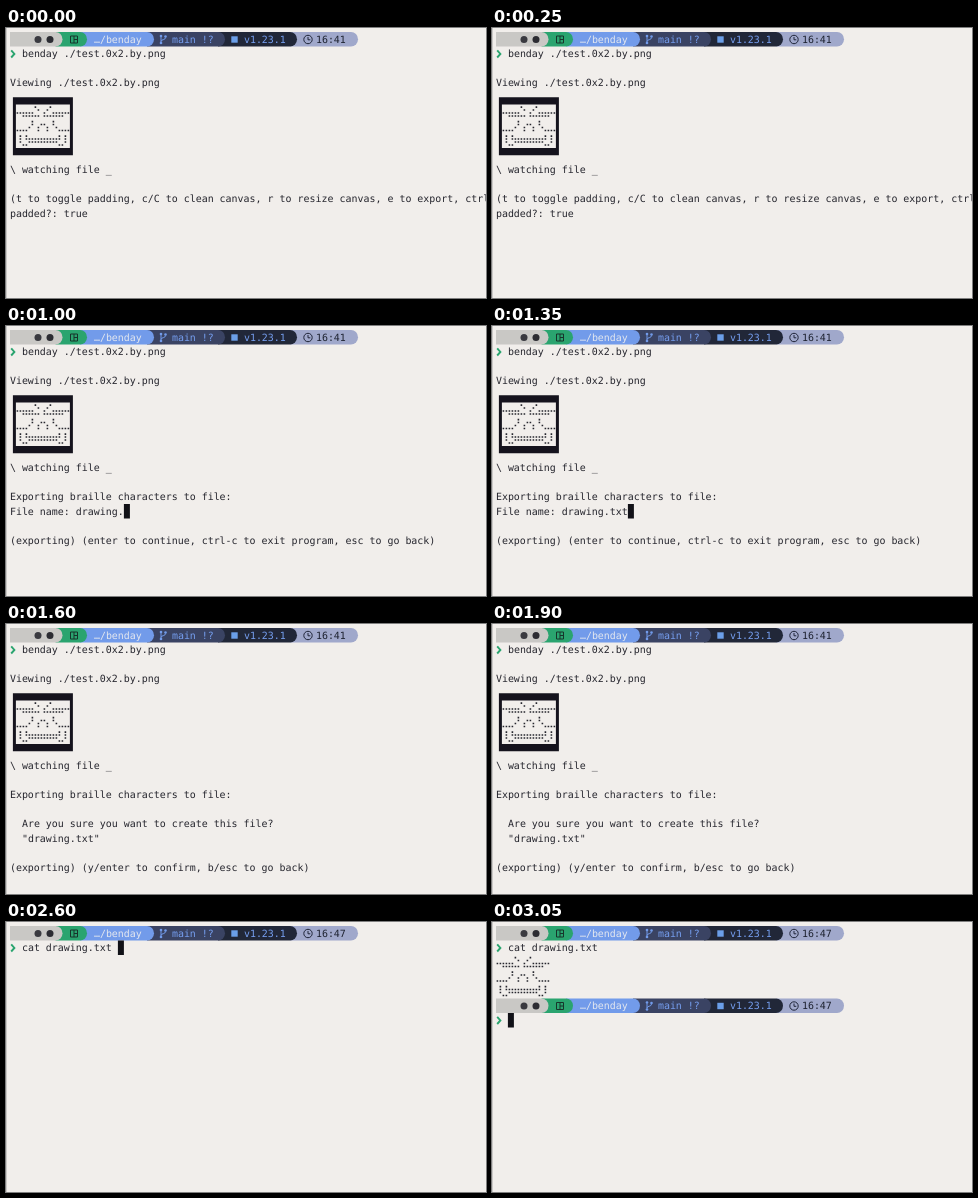
These frames come from a looping animation (480x270 px, 3100 ms). An HTML page:

```html
<!DOCTYPE html>
<html lang="en">
<head>
<meta charset="utf-8">
<title>Terminal session</title>
<style>
  html, body { margin: 0; width: 100%; height: 100%; overflow: hidden; background: #f1eeeb; }
  svg { display: block; width: 480px; height: 270px; }
  text {
    font: 9.96px "DejaVu Sans Mono", "Noto Sans Mono", monospace;
    white-space: pre;
    text-rendering: geometricPrecision;
  }
</style>
</head>
<body>
<svg id="stage" viewBox="0 0 480 270"></svg>
<script>
const LOOP = 3100, STEP = 50;
const CELL = 6, ROW = 14.5, LEFT = 3.9, TOP = 4;
const PAPER = '#f1eeeb', INK = '#26262e', GREEN = '#2aa46f';
const FILE = 'drawing.txt';
const FACE = ['⠤⣤⣤⣑⢠⣊⣤⣤⠤', '⣀⣀⠜⢠⠒⡄⠣⣀⣀', '⠸⣘⠶⠶⠶⠶⠶⣃⠇'];
const stage = document.getElementById('stage');

const colX = col => LEFT + col * CELL;
const rowY = row => TOP + row * ROW;
const rect = (x, y, w, h, fill) =>
  `<rect x="${x}" y="${y}" width="${w}" height="${h}" fill="${fill}"/>`;
const stroke = (d, color, width) =>
  `<path d="${d}" fill="none" stroke="${color}" stroke-width="${width}"/>`;
const text = (row, col, s, fill = INK) =>
  `<text x="${colX(col)}" y="${rowY(row) + 10.8}" fill="${fill}">${s}</text>`;
const cursor = (row, col) => rect(colX(col), rowY(row), CELL, ROW, '#111117');

// Each braille code holds one bit per dot of a 2 by 4 cell.
function braille(row, col) {
  const order = [[0, 0], [0, 1], [0, 2], [1, 0], [1, 1], [1, 2], [0, 3], [1, 3]];
  let d = '';
  FACE.forEach((line, r) => [...line].forEach((ch, c) => order.forEach(([dx, dy], bit) => {
    if (!((ch.codePointAt(0) - 0x2800) >> bit & 1)) return;
    const x = colX(col + c) + 0.7 + dx * 3, y = rowY(row + r) + 1.8 + dy * 2.95;
    d += `M${x} ${y}h1.6v1.6h-1.6z`;
  })));
  return `<path d="${d}" fill="${INK}"/>`;
}

function bar(row, clock) {
  const segments = [[56.5, '#c9c8c5'], [81, GREEN], [148, '#729bea'],
    [219, '#3a4363'], [291, '#212738'], [352, '#a0a8cb']];
  // Each segment tucks under the round end of the one before it.
  const shapes = segments.map(([end, fill], i) => {
    const start = i ? segments[i - 1][0] - 7 : 4;
    return `<path d="M${start} 0H${end - 7}a7 7.25 0 0 1 0 14.5H${start}z" fill="${fill}"/>`;
  }).reverse().join('');
  const icons =
    '<circle cx="32" cy="7.5" r="3.5" fill="#3a3a40"/>' +
    '<circle cx="44" cy="7.5" r="3.5" fill="#2c2c32"/>' +
    stroke('M64.5 4h7v7h-7zM68 4v7M68 7.5h3.5', '#17342b', 1) +
    stroke('M155 5v5M159.5 5.5c0 3-4.5 1.5-4.5 4', '#729bea', 1) +
    [[155, 4], [159.5, 4.5], [155, 11]].map(([x, y]) =>
      `<circle cx="${x}" cy="${y}" r="1.3" fill="#729bea"/>`).join('') +
    rect(225.3, 4.3, 6.4, 6.4, '#6b9fe8') +
    '<circle cx="302" cy="7.5" r="4.2" fill="none" stroke="#20263a"/>' +
    stroke('M302 5v2.8h2.3', '#20263a', 1);
  return `<g transform="translate(0 ${rowY(row)})">${shapes}${icons}</g>` +
    text(row, 14, '…/benday', '#e3e7ef') + text(row, 27, 'main !?', '#769ff0') +
    text(row, 39, 'v1.23.1', '#769ff0') + text(row, 51, clock, '#1d2230');
}

function prompt(row, clock, command) {
  const y = rowY(row + 1) + 7.4;
  return bar(row, clock) + stroke(`M5.2 ${y - 3.6}L8.4 ${y}L5.2 ${y + 3.6}`, GREEN, 1.9) +
    text(row + 1, 2, command);
}

function viewer(t) {
  const turned = t >= 2150 && Math.floor((t - 2150) / 100) % 2 === 0;
  const [left, right] = turned ? ['_', '/'] : ['\\', '_'];
  return prompt(0, '16:41', 'benday ./test.0x2.by.png') +
    text(3, 0, 'Viewing ./test.0x2.by.png') +
    rect(colX(0.5), rowY(4.5), CELL * 10, ROW * 4, '#15131d') +
    rect(colX(1), rowY(5), CELL * 9, ROW * 3, PAPER) + braille(5, 1) +
    text(9, 0, `${left} watching file ${right}`);
}

function mainMenu(status) {
  return text(11, 0, '(t to toggle padding, c/C to clean canvas, r to resize canvas, e to export, ctrl-c to exit') +
    text(12, 0, 'padded?: true' + status);
}

function nameForm(t) {
  const typed = FILE.slice(0, Math.max(0, (t - 600) / STEP));
  return text(11, 0, 'Exporting braille characters to file:') +
    text(12, 0, 'File name: ' + typed) + cursor(12, 11 + typed.length) +
    text(14, 0, '(exporting) (enter to continue, ctrl-c to exit program, esc to go back)');
}

function confirmForm() {
  return text(11, 0, 'Exporting braille characters to file:') +
    text(13, 2, 'Are you sure you want to create this file?') +
    text(14, 2, `"${FILE}"`) +
    text(16, 0, '(exporting) (y/enter to confirm, b/esc to go back)');
}

function shell(t) {
  if (t >= 2850) {
    return prompt(0, '16:47', 'cat ' + FILE) + braille(2, 0) +
      prompt(5, '16:47', '') + cursor(6, 2);
  }
  const command = t >= 2600 ? `cat ${FILE} ` : 'cat d'.slice(0, (t - 2350) / STEP);
  return prompt(0, '16:47', command) + cursor(1, 2 + command.length);
}

function scene(t) {
  if (t >= 2350) return shell(t);
  if (t >= 2050) return viewer(t) + mainMenu(', finished exporting to file!');
  if (t >= 1500) return viewer(t) + confirmForm();
  if (t >= 300) return viewer(t) + nameForm(t);
  return viewer(t) + mainMenu('');
}

let shown = -1;
function draw() {
  const t = Math.floor(performance.now() % LOOP / STEP) * STEP;
  if (t !== shown) {
    shown = t;
    stage.innerHTML = rect(0, 0, 480, 270, PAPER) + rect(0, 0, 1, 270, '#cbc9c7') + scene(t);
  }
  requestAnimationFrame(draw);
}
draw();
</script>
</body>
</html>
```
